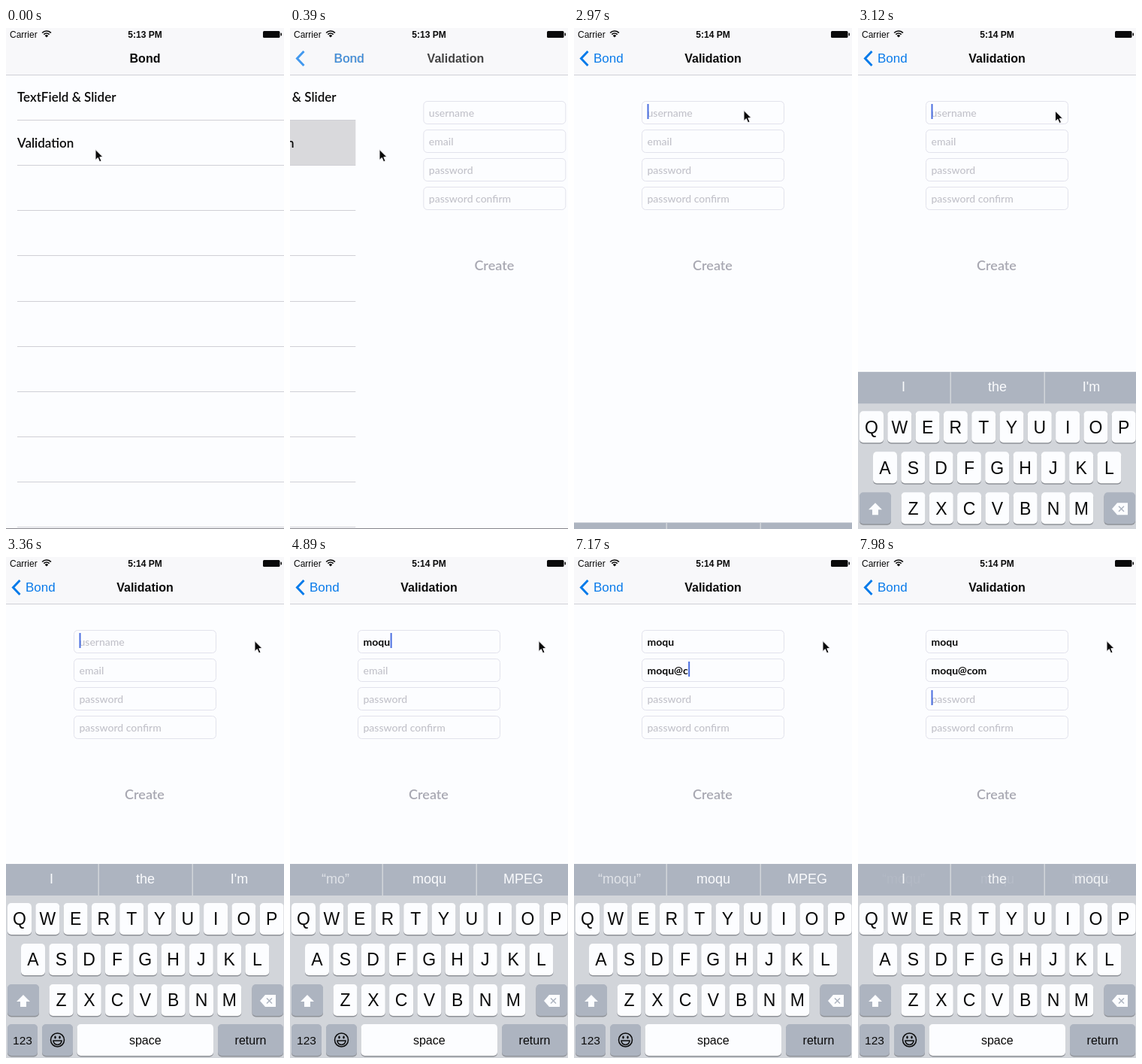
An HTML page with a canvas for the animation above (8000 ms loop, 370 by 666 pixels).

```html
<!DOCTYPE html>
<html lang="en">
<head>
<meta charset="utf-8">
<title>Form validation</title>
<style>
html, body { margin: 0; width: 100%; height: 100%; overflow: hidden; background: #fcfcff; }
canvas { display: block; width: 370px; height: 666px; }
</style>
</head>
<body>
<canvas id="stage" width="370" height="666"></canvas>
<script>
const ctx = document.getElementById('stage').getContext('2d');
const W = 370, H = 666, LOOP = 8000;
const SANS = '"Liberation Sans", Arial, sans-serif';
const ROUND = 'Lato, "Open Sans", sans-serif';
const PAPER = '#fcfdff', BAR = '#f8f8fa', RULE = '#d0d0d6', BLUE = '#0a7bea';
const KEYBOARD = '#d2d5da', GRAY = '#adb4c0', INK = '#0a0a0a';

const PUSH = [200, 700], KEYBOARD_RISE = [2967, 3330], CLOCK_TICK = 1950;

const pointerPath = [
  [0, 119, 161], [800, 119, 161], [1350, 171, 204], [1800, 171, 204],
  [2600, 226, 109], [2990, 226, 109], [3320, 331, 111]
];

const fields = [
  { hint: 'username', value: 'moqu', focus: 2880, keys: [4150, 4400, 4620, 4820] },
  { hint: 'email', value: 'moqu@com', focus: 5500, keys: [6000, 6200, 6420, 6600, 6950, 7150, 7300, 7450] },
  { hint: 'password', value: '', focus: 7800, keys: [] },
  { hint: 'password confirm', value: '', focus: Infinity, keys: [] }
];

const suggestions = [
  [0, 'I', 'the', "I'm"],
  [4200, '“m”', 'my', 'me'],
  [4450, '“mo”', 'moqu', 'MPEG'],
  [5550, 'I', 'the', 'moqu'],
  [6020, '“m”', 'moqu', 'My'],
  [6180, '“mo”', 'moqu', 'My'],
  [6640, '“moqu”', 'moqu', 'MPEG'],
  [7850, 'I', 'the', 'moqu']
];

const clamp = v => Math.max(0, Math.min(1, v));
const progress = (t, [from, to]) => clamp((t - from) / (to - from));
const easeOut = p => 1 - (1 - p) ** 3;
const easeInOut = p => p * p * (3 - 2 * p);
const mix = (a, b, p) => a + (b - a) * p;

function rect(x, y, w, h, color) {
  ctx.fillStyle = color;
  ctx.fillRect(x, y, w, h);
}

function rounded(x, y, w, h, r, color) {
  ctx.beginPath();
  ctx.roundRect(x, y, w, h, r);
  ctx.fillStyle = color;
  ctx.fill();
}

function text(str, x, y, font, color, align = 'left') {
  ctx.font = font;
  ctx.fillStyle = color;
  ctx.textAlign = align;
  ctx.fillText(str, x, y);
}

function polygon(points, color) {
  ctx.beginPath();
  points.forEach(([x, y]) => ctx.lineTo(x, y));
  ctx.closePath();
  ctx.fillStyle = color;
  ctx.fill();
}

function withState(draw, { x = 0, y = 0, alpha = 1 }) {
  ctx.save();
  ctx.translate(x, y);
  ctx.globalAlpha *= alpha;
  draw();
  ctx.restore();
}

function drawStatusBar(t) {
  text('Carrier', 5, 13, `12px ${SANS}`, INK);
  text(t < CLOCK_TICK ? '5:13 PM' : '5:14 PM', 185, 13, `bold 12px ${SANS}`, INK, 'center');
  ctx.strokeStyle = INK;
  ctx.lineWidth = 1.7;
  for (const r of [8, 5]) {
    ctx.beginPath();
    ctx.arc(54, 12, r, -Math.PI * 0.76, -Math.PI * 0.24);
    ctx.stroke();
  }
  ctx.beginPath();
  ctx.moveTo(54, 12.5);
  ctx.arc(54, 12.5, 3.2, -Math.PI * 0.76, -Math.PI * 0.24);
  ctx.fillStyle = INK;
  ctx.fill();
  rounded(342, 4, 22.5, 9, 1.5, INK);
  rounded(365.5, 6.5, 1.5, 4, 1, INK);
}

function drawNavigation(t, p) {
  rect(0, 0, W, 62, BAR);
  rect(0, 62, W, 1, RULE);
  drawStatusBar(t);
  withState(() => text('Bond', 185, 46, `bold 16px ${SANS}`, INK, 'center'),
    { x: -139 * p, alpha: 1 - p });
  withState(() => text('Validation', 185, 46, `bold 16px ${SANS}`, INK, 'center'),
    { x: 150 * (1 - p), alpha: p });
  withState(() => text('Bond', 26, 46, `17px ${SANS}`, BLUE),
    { x: 139 * (1 - p), alpha: p });
  withState(() => {
    ctx.beginPath();
    ctx.moveTo(18.5, 31);
    ctx.lineTo(9.5, 40.5);
    ctx.lineTo(18.5, 50);
    ctx.strokeStyle = BLUE;
    ctx.lineWidth = 3;
    ctx.stroke();
  }, { alpha: p });
}

function drawList(t) {
  rect(0, 0, W, H, PAPER);
  if (t > 100) rect(0, 122, W, 60, '#d9d9dc');
  for (let i = 0; i < 10; i++) rect(15, Math.round(122 + i * 60.15), W, 1, RULE);
  text('TextField & Slider', 15, 98, `600 17px ${ROUND}`, INK);
  text('Validation', 15, 158.5, `600 17px ${ROUND}`, INK);
}

function drawField(field, i, t, active) {
  const y = 97 + i * 38;
  ctx.beginPath();
  ctx.roundRect(90.5, y + 0.5, 189, 30, 5);
  ctx.strokeStyle = '#e2e2ec';
  ctx.lineWidth = 1;
  ctx.stroke();

  const typed = field.value.slice(0, field.keys.filter(k => k <= t).length);
  if (typed) text(typed, 97.5, y + 20.5, `bold 14px ${ROUND}`, INK);
  else text(field.hint, 97.5, y + 20.5, `500 14px ${ROUND}`, '#c2c2ca');

  if (!active) return;
  const lastInput = Math.max(field.focus, ...field.keys.filter(k => k <= t));
  const caretX = typed ? 98 + ctx.measureText(typed).width : 97.5;
  if ((t - lastInput) % 1000 < 600) rect(caretX, y + 4, 2, 20, '#4a6ee0');
}

function drawForm(t) {
  rect(0, 0, W, H, PAPER);
  const active = fields.findLast(f => f.focus <= t);
  fields.forEach((f, i) => drawField(f, i, t, f === active));
  text('Create', 184.5, 321.5, `600 18px ${ROUND}`, '#a8a8b2', 'center');
}

function key(x, y, w, label, size = 23, color = PAPER) {
  rounded(x, y + 1, w, 42.5, 5, '#8f9298');
  rounded(x, y, w, 42, 5, color);
  text(label, x + w / 2, y + 21 + size * 0.36, `${size}px ${SANS}`, INK, 'center');
}

function drawSuggestions(t) {
  rect(0, 0, W, 42, GRAY);
  rect(122.5, 0, 1.5, 42, KEYBOARD);
  rect(247.5, 0, 1.5, 42, KEYBOARD);
  const index = suggestions.findLastIndex(s => s[0] <= t);
  const [start, ...words] = suggestions[index];
  const previous = suggestions[Math.max(0, index - 1)].slice(1);
  const p = clamp((t - start) / 150);
  words.forEach((word, i) => {
    const show = (str, alpha) => withState(() =>
      text(str, 60.5 + i * 125, 26, `18px ${SANS}`, str[0] === '“' ? '#e0e3e8' : '#fafbfd', 'center'), { alpha });
    if (word === previous[i]) return show(word, 1);
    show(previous[i], 1 - p);
    show(word, p);
  });
}

function drawKeyIcons() {
  polygon([[23, 174], [32, 183], [27, 183], [27, 190], [19, 190], [19, 183], [14, 183]], PAPER);

  polygon([[338, 182], [345, 174], [359, 174], [359, 190], [345, 190]], PAPER);
  ctx.strokeStyle = GRAY;
  ctx.lineWidth = 1.5;
  ctx.beginPath();
  ctx.moveTo(347, 178.5);
  ctx.lineTo(354, 185.5);
  ctx.moveTo(354, 178.5);
  ctx.lineTo(347, 185.5);
  ctx.stroke();

  ctx.strokeStyle = ctx.fillStyle = INK;
  ctx.beginPath();
  ctx.arc(68.5, 234, 9, 0, 7);
  ctx.stroke();
  ctx.beginPath();
  ctx.arc(68.5, 235, 5.5, 0, Math.PI);
  ctx.closePath();
  ctx.stroke();
  for (const x of [65.5, 71.5]) {
    ctx.beginPath();
    ctx.ellipse(x, 230.5, 1.2, 1.9, 0, 0, 7);
    ctx.fill();
  }
}

function drawKeyboard(t) {
  rect(0, 0, W, 258, KEYBOARD);
  drawSuggestions(t);
  const rows = [['QWERTYUIOP', 2], ['ASDFGHJKL', 20], ['ZXCVBNM', 57.5]];
  rows.forEach(([letters, x], row) =>
    [...letters].forEach((c, i) => key(x + i * 37.3, 52 + row * 54, 32, c)));
  key(2, 160, 42, '', 16, GRAY);
  key(327.5, 160, 41.5, '', 16, GRAY);
  key(2, 213, 40, '123', 15.5, GRAY);
  key(48, 213, 41, '', 16, GRAY);
  key(94.5, 213, 181.5, 'space', 16);
  key(282, 213, 87, 'return', 16, GRAY);
  drawKeyIcons();
}

function drawPointer(t) {
  const i = pointerPath.findLastIndex(p => p[0] <= t);
  const a = pointerPath[i], b = pointerPath[i + 1] || a;
  const p = a === b ? 0 : easeInOut(progress(t, [a[0], b[0]]));
  withState(() => {
    polygon([[0, 0], [0, 14], [3.3, 11], [5.6, 16.3], [8, 15.2], [5.8, 10.2], [10, 10]], INK);
    ctx.strokeStyle = '#f6f6fa';
    ctx.lineWidth = 1;
    ctx.lineJoin = 'round';
    ctx.stroke();
  }, { x: mix(a[1], b[1], p), y: mix(a[2], b[2], p) + 0.5 });
}

function draw(now) {
  const t = now % LOOP;
  const push = easeOut(progress(t, PUSH));
  const rise = easeOut(progress(t, KEYBOARD_RISE));
  if (push < 1) withState(() => drawList(t), { x: -W * 0.3 * push });
  if (push > 0) withState(() => drawForm(t), { x: W * (1 - push) });
  rect(0, 665, W, 1, '#85858c');
  drawNavigation(t, push);
  if (rise > 0) withState(() => drawKeyboard(t), { y: mix(H, 408, rise) });
  drawPointer(t);
}

function frame() {
  draw(performance.now());
  requestAnimationFrame(frame);
}
frame();
</script>
</body>
</html>
```
